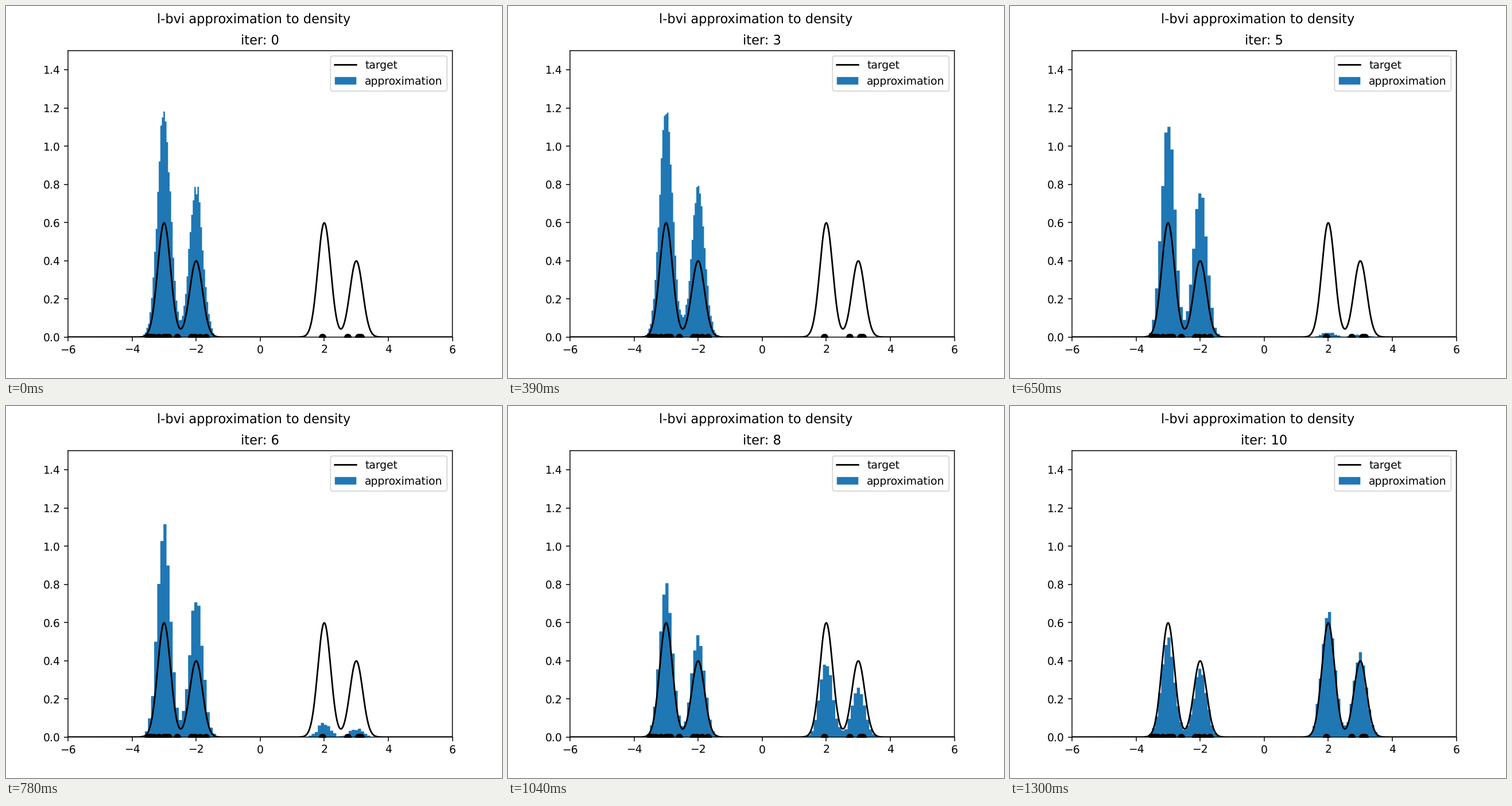
A matplotlib script for the animation above (1.43 s loop, 864 by 648 pixels).

```python
import numpy as np
import matplotlib.pyplot as plt
from matplotlib.animation import FuncAnimation

# Subpixel placement of text and shapes
plt.rcParams.update({"text.hinting": "none", "path.snap": False})

MEANS = np.array([-3, -2, 2, 3])
FRAMES = 11
SAMPLES = 30000
ORIGIN, BIN = -3.118, 0.0482
DOTS = [-3.49, -3.42, -3.33, -3.16, -3.0, -2.93, -2.855, -2.595,
        -2.14, -2.04, -1.88, -1.69, 1.945, 2.735, 3.07, 3.14]


def mixture(x, right, sigma):
    """Density of the four bumps with the given mass on the right pair."""
    weights = np.outer([1 - right, right], [0.6, 0.4]).ravel()
    z = (x[:, None] - MEANS) / sigma
    return np.exp(-z**2 / 2) @ weights / (sigma * np.sqrt(2 * np.pi))


def density(x):
    left_first = mixture(x, 0, 0.2)
    return (left_first + mixture(x, 1, 0.2)) / 2


def right_mass(i):
    return np.interp(i, [4, 5, 7, 8, 10], [0, 0.02, 0.09, 0.33, 0.555])


def histogram(i):
    """Noisy sampled bars; bins double in width once both sides are covered."""
    right = right_mass(i)
    width = 2 * BIN if right else BIN
    reach = 3.8 if right else -1.2
    edges = np.arange(ORIGIN - 14 * BIN, reach, width)
    expected = mixture(edges[:-1] + width / 2, right, 0.204)
    scale = width * SAMPLES
    counts = np.random.default_rng(i).poisson(expected * scale)
    return counts / scale, edges


fig, ax = plt.subplots(figsize=(6.4, 4.8), dpi=135)
fig.suptitle("l-bvi approximation to density")
x = np.linspace(-6, 6, 1000)
ax.plot(x, density(x), "k", label="target")
bars = ax.stairs(*histogram(0), fill=True, color="C0", label="approximation")
ax.plot(DOTS, np.zeros(len(DOTS)), "ko")
ax.set_xlim(-6, 6)
ax.set_ylim(0, 1.5)
ax.legend(loc="upper right")


def update(i):
    bars.set_data(*histogram(i))
    ax.set_title(f"iter: {i}")
    return bars, ax.title


anim = FuncAnimation(fig, update, frames=FRAMES, interval=130, repeat=True)
plt.show()
```
